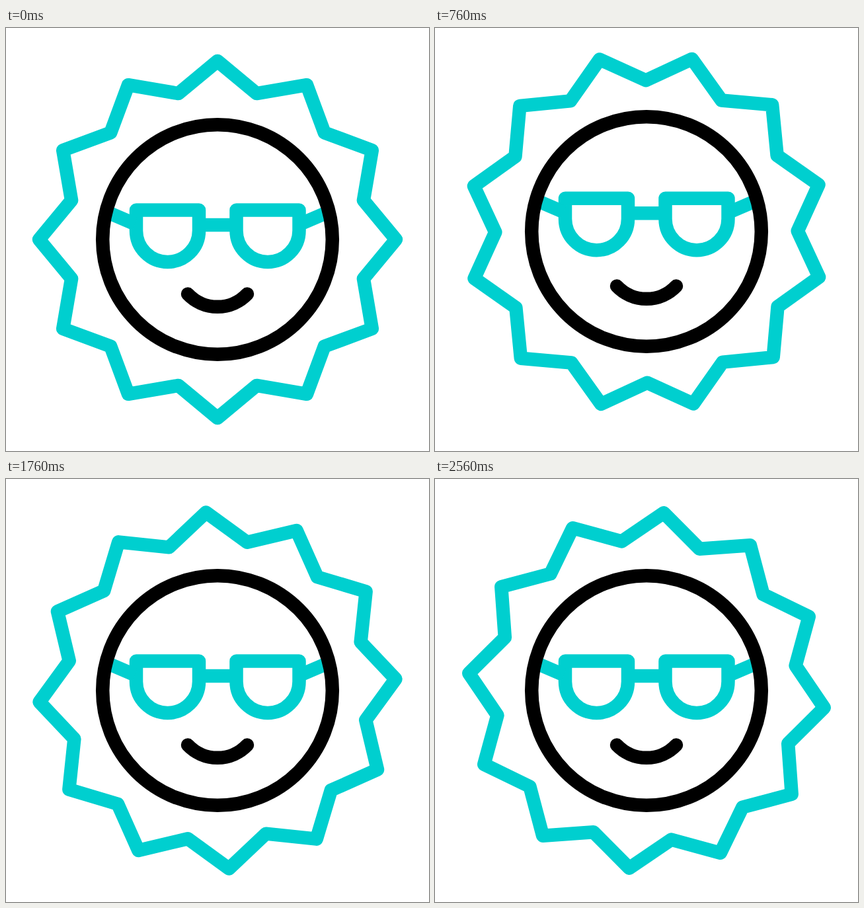
These frames come from a looping animation (640 px wide and 640 px high, 2.6 s). An HTML page:

```html
<!DOCTYPE html>
<html lang="en">
<head>
<meta charset="utf-8">
<title>Cool sun</title>
<style>
  html, body { margin: 0; width: 100%; height: 100%; overflow: hidden; background: #fff; }
  svg { display: block; width: 100%; height: 100%; }
  .line { fill: none; stroke-width: 20.5; stroke-linejoin: round; }
  .teal { stroke: #00cfcf; }
  .dark { stroke: #000; stroke-linecap: round; }
</style>
</head>
<body>
<svg viewBox="0 0 640 640">
  <g id="sun">
    <path id="rays" class="line teal"/>
    <g id="glasses" class="line teal">
      <path d="M197 275.5H292V306.5A47.5 47.5 0 0 1 197 306.5Z"/>
      <path d="M348.5 275.5H443.5V306.5A47.5 47.5 0 0 1 348.5 306.5Z"/>
      <path d="M292 298H348.5M153 278.5L195 296.5M487.5 278.5L445.5 296.5"/>
    </g>
    <circle class="line dark" cx="320" cy="320" r="173.8"/>
    <path class="line dark" d="M275 402.5A62 62 0 0 0 365 402.5"/>
  </g>
</svg>
<script>
  const LOOP = 2600, STEP = 40, C = 320;
  const $ = id => document.getElementById(id);

  // [time, vertical offset] turning points
  const bob = [[0, 0], [290, 19.5], [660, -17.6], [1000, 10.5], [1375, -9.8], [1720, 0]];
  const slip = [[0, 0], [320, 8.2], [680, -8.3], [1000, 8.5], [1370, -8.3], [1720, 0]];

  function sway(keys, t) {
    const i = keys.findIndex(k => k[0] > t);
    if (i < 0) return keys[keys.length - 1][1];
    const [t0, a] = keys[i - 1], [t1, b] = keys[i];
    return a + (b - a) * (1 - Math.cos(Math.PI * (t - t0) / (t1 - t0))) / 2;
  }

  function star(tips, outer, inner) {
    const pts = [];
    for (let i = 0; i < tips * 2; i++) {
      const r = i % 2 ? inner : outer, a = i * Math.PI / tips;
      pts.push((C + r * Math.sin(a)).toFixed(2) + " " + (C - r * Math.cos(a)).toFixed(2));
    }
    return "M" + pts.join("L") + "Z";
  }

  function draw(t) {
    $("sun").setAttribute("transform", `translate(0 ${sway(bob, t)})`);
    $("glasses").setAttribute("transform", `translate(0 ${sway(slip, t)})`);
    $("rays").setAttribute("transform", `rotate(${-360 * t / LOOP} ${C} ${C})`);
  }

  $("rays").setAttribute("d", star(12, 270, 228.7));
  draw(0);

  let start;
  function tick(now) {
    if (start === undefined) start = now;
    draw(Math.floor((now - start) % LOOP / STEP) * STEP);
    requestAnimationFrame(tick);
  }
  requestAnimationFrame(tick);
</script>
</body>
</html>
```
